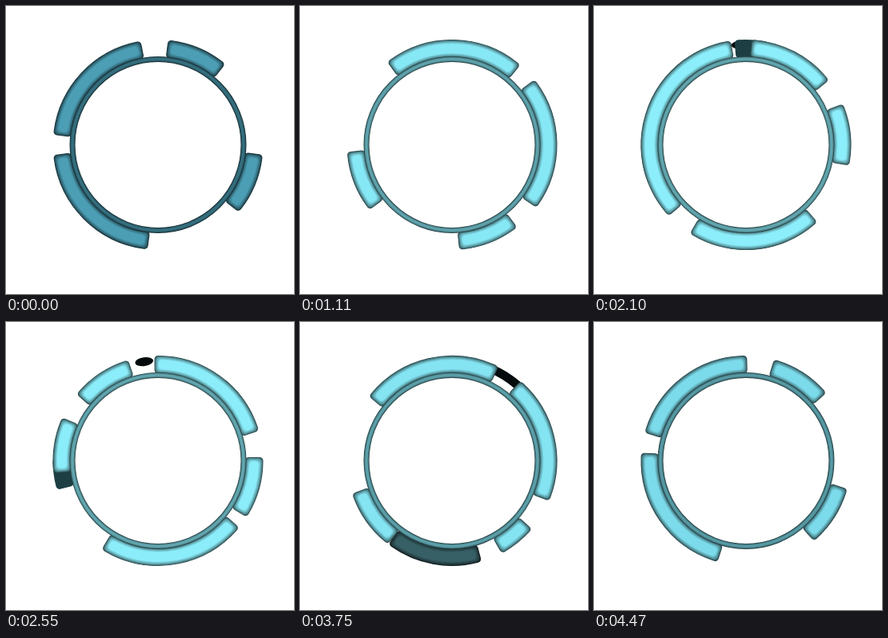
An HTML page with a canvas that plays this animation: 360x360 px, repeating every 4.5 s.

```html
<!DOCTYPE html>
<html>
<head>
<meta charset="utf-8">
<style>
html, body { margin: 0; width: 100%; height: 100%; overflow: hidden; background: #fff; }
canvas { display: block; width: 360px; height: 360px; }
</style>
</head>
<body>
<canvas id="stage" width="360" height="360"></canvas>
<script>
const ctx = document.getElementById('stage').getContext('2d');
const LOOP = 4500, CX = 190, CY = 173.4;
const BASE = [136, 233, 246], FADE = [1.5, 1, 0.8];
const ARCS = { b: [-0.7, 34], c: [89.3, 124], d: [179.5, 258.5], a: [269.3, 344.7] };

const clamp = (x, lo = 0, hi = 1) => Math.max(lo, Math.min(hi, x));
const rad = deg => (deg - 90) * Math.PI / 180;

// 0..1 envelope with linear ends
const win = (t, a, b, ramp = 200) => clamp(Math.min((t - a) / ramp, (b - t) / ramp));

// front set: three uneven turns per loop
const TURNS = [[0, 6], [510, -67.5], [1650, -353], [2550, -631.4], [3150, -732], [3750, -952], [4470, -1064], [LOOP, -1074]];
function frontSpin(t) {
  const i = TURNS.findIndex(p => p[0] > t);
  const [t0, v0] = TURNS[i - 1], [t1, v1] = TURNS[i];
  return v0 + (v1 - v0) * (t - t0) / (t1 - t0);
}

// rear set: steady turn, slowly gaining speed
function backSpin(t) {
  const u = (t - 1650) / 900;
  return 178 - 213.4 * u - 14.9 * u * u;
}

const light = t => 0.94 + 0.08 * Math.sin(Math.PI * t / LOOP) - 0.26 * Math.exp(-t / 120);

const tone = (glow, shade) =>
  `rgb(${BASE.map((v, i) => Math.min(255, Math.round(v * shade * glow ** FADE[i]))).join()})`;

function sector([from, to], inset, color) {
  const pad = inset + 4.5, turn = pad / 121;
  const a = rad(from) + turn, b = rad(to) - turn;
  if (b <= a) return;
  ctx.beginPath();
  ctx.arc(CX, CY, 131.5 - pad, a, b);
  ctx.arc(CX, CY, 109 + pad, b, a, true);
  ctx.closePath();
  ctx.fillStyle = ctx.strokeStyle = color;
  ctx.lineWidth = 9;
  ctx.fill();
  ctx.stroke();
}

// soft tubes: all spans share each shade, so overlaps merge without seams
function tubes(spans, glow, dim = 1) {
  for (let x = 0; x <= 1; x += 0.1) {
    const shade = dim * (0.28 + 0.72 * x ** 0.7);
    for (const span of spans) sector(span, x * 5.5, tone(glow, shade));
  }
}

function span(name, spin, show = 1, trimStart = 0, trimEnd = 0) {
  const [s, e] = ARCS[name];
  const to = spin + e - trimEnd;
  return [to - (e - s - trimStart - trimEnd) * show, to];
}

function ring(glow) {
  for (let x = 0; x <= 1; x += 0.25) {
    ctx.beginPath();
    ctx.arc(CX, CY, 107, 0, 7);
    ctx.lineWidth = 7 - 4.6 * x;
    ctx.strokeStyle = tone(glow, 0.27 + 0.43 * x ** 0.6);
    ctx.stroke();
  }
}

// dark opening that drifts back and closes
function spot(t) {
  const u = (t - 1650) / 1500;
  const size = Math.min(15 - 10 * u * u, (t - 1350) / 20);
  if (size < 1) return;
  const a = rad(-22 * u * Math.abs(u));
  ctx.save();
  ctx.translate(CX + 125 * Math.cos(a), CY + 125 * Math.sin(a));
  ctx.rotate(a + Math.PI / 2);
  ctx.beginPath();
  ctx.ellipse(0, 0, size, Math.min(5.5, size * 0.55), 0, 0, 7);
  ctx.fillStyle = '#050b0c';
  ctx.fill();
  ctx.restore();
}

function draw(t) {
  ctx.fillStyle = '#fff';
  ctx.fillRect(0, 0, 360, 360);
  ctx.lineJoin = 'round';
  const glow = light(t), front = frontSpin(t), back = backSpin(t);
  const on = win(t, 1200, 2850), shade = win(t, 3450, 4050);

  spot(t);
  const spans = [
    span('a', front, 1, 3 * shade),
    span('b', front, 1, 3 * shade, 10 * shade),
    span('c', front),
    span('d', front, 1 - win(t, 1250, 2850))
  ];
  if (shade > 0) {
    tubes([span('d', back, shade, 25)], glow, 0.42);
    const mid = rad(front + 264), r = 125;
    ctx.beginPath();
    ctx.arc(CX, CY, r, mid - 0.16 * shade, mid + 0.16 * shade);
    ctx.lineWidth = 11;
    ctx.strokeStyle = '#050b0c';
    ctx.stroke();
  }
  if (on > 0) {
    const trim = 8 + 36 * clamp((t - 1650) / 900);
    const head = back + 270 + trim;
    if (trim > 20) sector([head - 10, head + 8], 0, '#1d3f43');
    spans.push(
      span('a', back, on, trim),
      span('b', back, on),
      span('c', back, on),
      span('d', back, on, 8 * win(t, 1400, 1900))
    );
  }
  tubes(spans, glow);
  ring(glow);
}

// pictures start at 0, 60, 90 and 120 ms of every 150 ms
function step(t) {
  const part = t % 150;
  return t - part + (part < 60 ? 0 : Math.floor(part / 30) * 30);
}

let start = null;
function tick(now) {
  if (start === null) start = now;
  draw(step((now - start) % LOOP));
  requestAnimationFrame(tick);
}
draw(0);
requestAnimationFrame(tick);
</script>
</body>
</html>
```
